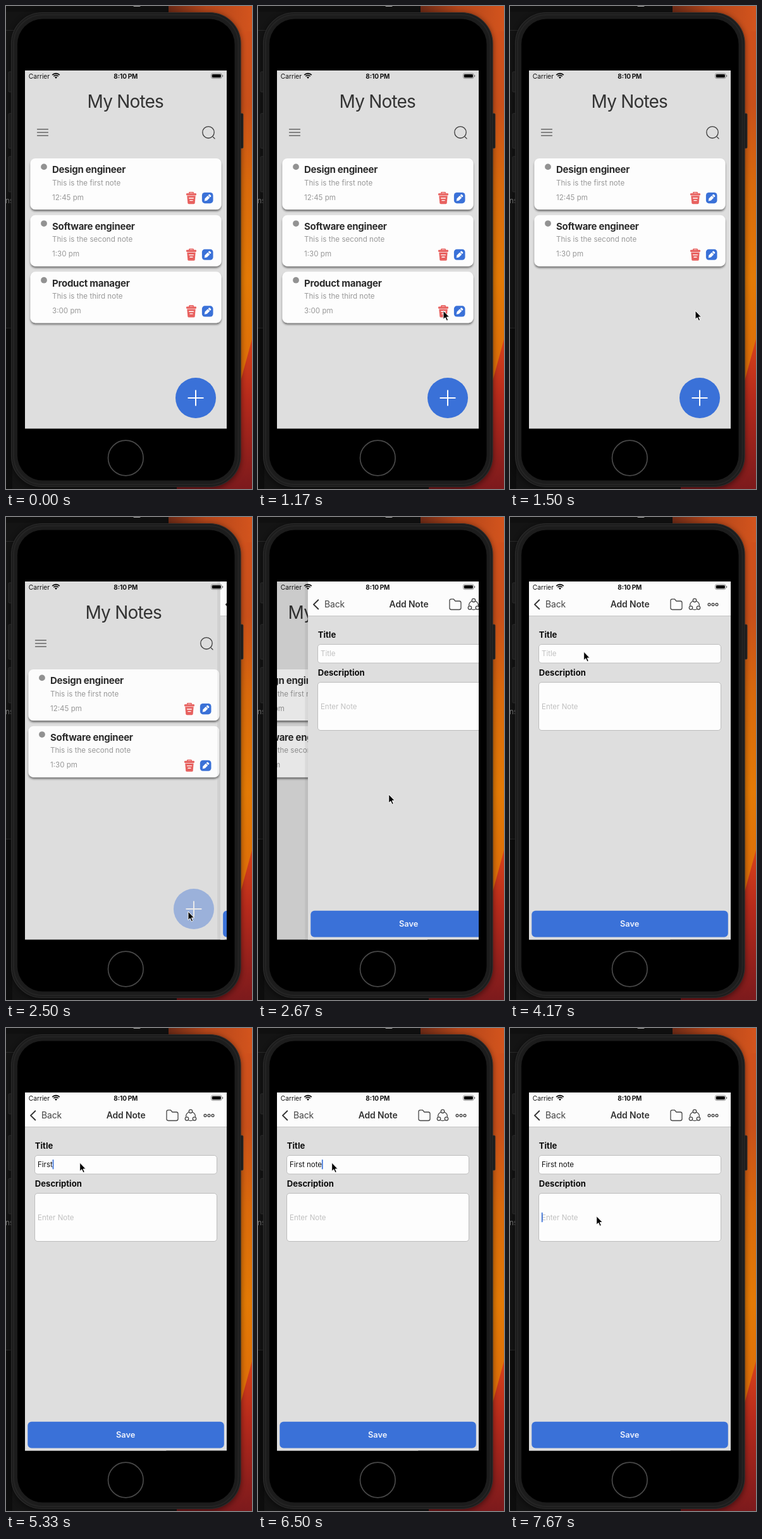
Recreate the animation shown at these times as an HTML page. Size 389 by 764 pixels, loop 8000 ms.

```html
<!DOCTYPE html>
<html lang="en">
<head>
<meta charset="utf-8">
<title>Notes</title>
<style>
  html, body { margin: 0; width: 100%; height: 100%; overflow: hidden; background: #131313; }
  svg { display: block; width: 100%; height: 100%; }
  text { font-family: Inter, Roboto, sans-serif; white-space: pre; }
  .h1 { font-size: 28px; letter-spacing: -.8px; fill: #333; }
  .name { font-size: 15px; font-weight: 700; letter-spacing: -.25px; fill: #2b2b2b; }
  .sub { font-size: 11.6px; fill: #999; }
  .status { font-size: 10.2px; fill: #111; }
  .clock { font-size: 10px; font-weight: 700; }
  .nav { font-size: 13.9px; letter-spacing: -.1px; fill: #444; }
  .label { font-size: 13.1px; font-weight: 700; fill: #0c0c0c; }
  .input { font-size: 11.5px; fill: #111; }
  .hint { fill: #c0c0c0; }
  .save { font-size: 12.8px; font-weight: 600; fill: #eef2fc; }
  .line { fill: none; stroke: #444; stroke-width: 1.3; stroke-linecap: round; stroke-linejoin: round; }
</style>
</head>
<body>
<svg id="stage" viewBox="0 0 389 764" preserveAspectRatio="none"></svg>
<script>
const TICK = 1000 / 6, LOOP = 8000, SCREEN_W = 319;
const BLUE = '#3a71d8', GREY = '#dedede';

const rect = (x, y, w, h, r, fill, more = '') =>
  `<rect x="${x}" y="${y}" width="${w}" height="${h}" rx="${r}" fill="${fill}" ${more}/>`;
const circle = (x, y, r, fill, more = '') =>
  `<circle cx="${x}" cy="${y}" r="${r}" fill="${fill}" ${more}/>`;
const text = (x, y, cls, s, more = '') => `<text x="${x}" y="${y}" class="${cls}" ${more}>${s}</text>`;
const line = (d, more = '') => `<path class="line" d="${d}" ${more}/>`;
const mid = 'text-anchor="middle"';

const defs = `<defs>
  <linearGradient id="wallTop"><stop stop-color="#6b2a16"/><stop offset=".45" stop-color="#b2451a"/><stop offset="1" stop-color="#d3541d"/></linearGradient>
  <linearGradient id="wall" x1="0" y1="0" x2="0" y2="1">
    <stop stop-color="#cf501c"/><stop offset=".2" stop-color="#c9501a"/><stop offset=".42" stop-color="#d96a0c"/>
    <stop offset=".68" stop-color="#e37a06"/><stop offset="1" stop-color="#dc6a0a"/></linearGradient>
  <linearGradient id="wallLow" x1="0" y1="0" x2="0" y2="1">
    <stop stop-color="#d8421a"/><stop offset=".4" stop-color="#b52a1c"/><stop offset="1" stop-color="#7c1a1c"/></linearGradient>
  <filter id="cardShadow" x="-5%" y="-10%" width="110%" height="130%">
    <feDropShadow dx="0" dy="2.6" stdDeviation="1.5" flood-color="#000" flood-opacity=".48"/></filter>
  <filter id="soft" x="-10%" y="-10%" width="120%" height="120%"><feGaussianBlur stdDeviation="4"/></filter>
  <clipPath id="screen"><rect x="30" y="102" width="${SCREEN_W}" height="566.5"/></clipPath>
</defs>`;

function desktop() {
  return rect(0, 0, 389, 764, 0, '#141414')
    + rect(0, 0, 257, 9, 0, '#101010') + rect(0, 38, 20, 1, 0, '#2a2a2a')
    + rect(0, 509, 10, 255, 0, '#0d0d0d') + rect(0, 509, 10, 1, 0, '#292929')
    + rect(201, -3, 12, 4, 2, '#aaa')
    + text(-1, 312, 'sub', 'ns', 'style="fill:#777"')
    + rect(257, 0, 132, 70, 0, 'url(#wallTop)')
    + rect(365, 40, 24, 580, 0, 'url(#wall)')
    + '<path d="M389 527L368 604L330 740L270 755V764H389Z" fill="url(#wallLow)"/>';
}

function phone() {
  const buttons = [[4, 104, 32], [4, 170, 55], [4, 238, 56], [369, 170, 55]]
    .map(([x, y, h]) => rect(x, y, 6, h, 1.5, '#1b1b1b', 'stroke="#343434" stroke-width=".8"')).join('');
  return rect(7, 11, 365, 753, 50, '#000', 'opacity=".45" filter="url(#soft)"')
    + buttons
    + rect(8.5, 10.5, 362.5, 750, 49, '#1c1c1c', 'stroke="#2c2c2c" stroke-width="1.2"')
    + rect(12, 14, 355.5, 743, 46, 'none', 'stroke="#242424" stroke-width="2"')
    + rect(18, 20.5, 343.5, 730, 40, '#000')
    + circle(189.3, 715, 27.8, 'none', 'stroke="#484848" stroke-width="1.7"');
}

const bin = `<g fill="#e8615f">
  <path d="M-4 -7V-8.2Q-4 -9.6 -2.6 -9.6H2.6Q4 -9.6 4 -8.2V-7H2.4V-8H-2.4V-7Z"/>
  ${rect(-8, -7.4, 16, 3.2, 1.2, '#e8615f')}
  <path d="M-6.7 -3.4H6.7L5.7 8Q5.5 9.6 3.9 9.6H-3.9Q-5.5 9.6 -5.7 8Z"/>
  <path d="M-3.3 .4H3.3M-2 4H2" stroke="#fff" stroke-width="1.4" stroke-linecap="round"/></g>`;

const pencil = rect(-8.8, -8.6, 17.6, 17.2, 4.6, BLUE)
  + `<g transform="rotate(45)" fill="#fff"><path d="M-2.3 -2.7H2.3V3.6L0 7L-2.3 3.6Z"/>
     ${rect(-2.3, -6.4, 4.6, 2.9, 1.2, '#fff')}</g>`;

function card(i, name, sub, time) {
  return `<g id="card${i}" transform="translate(0 ${i * 89.65})">`
    + rect(38.5, 241, 302, 81, 8, '#fdfdfd', 'filter="url(#cardShadow)"')
    + circle(60, 254.4, 4.9, '#929292')
    + text(73, 264.3, 'name', name) + text(73, 283.8, 'sub', sub) + text(73, 306.8, 'sub', time)
    + `<g id="bin${i}" transform="translate(293 303.6)">${bin}</g>`
    + `<g transform="translate(318.7 303.6)">${pencil}</g></g>`;
}

function listView() {
  return '<g id="list">' + rect(30, 102, SCREEN_W, 567, 0, GREY)
    + text(188.8, 160.6, 'h1', 'My Notes', mid)
    + line('M49.5 195H66.5M49.5 200H66.5M49.5 205H66.5', 'style="stroke:#666"')
    + line('M327.5 207.2L330 209.7') + circle(320, 199.8, 9.2, 'none', 'stroke="#3c3c3c" stroke-width="1.3"')
    + card(0, 'Design engineer', 'This is the first note', '12:45 pm')
    + card(1, 'Software engineer', 'This is the second note', '1:30 pm')
    + card(2, 'Product manager', 'This is the third note', '3:00 pm')
    + `<g id="plus">${circle(300, 620, 32, BLUE)}
       <path d="M288.3 620H311.7M300 608.3V631.7" stroke="#fff" stroke-width="2" stroke-linecap="round"/></g>`
    + rect(30, 102, SCREEN_W, 567, 0, '#000', 'id="dim" opacity="0"') + '</g>';
}

function formView() {
  const node = (x, y) => circle(x, y, 2.7, 'none', 'class="line"');
  const field = (y, h) => rect(45.5, y, 288, h, 4.5, '#fdfdfd', 'stroke="#bdbdbd" stroke-width="1"');
  return '<g id="form">'
    + rect(26, 102, 8, 567, 0, '#000', 'opacity=".1" filter="url(#soft)"')
    + rect(30, 102, SCREEN_W, 567, 0, GREY)
    + rect(30, 102, SCREEN_W, 54, 0, '#fcfcfc') + rect(30, 156, SCREEN_W, 1, 0, '#c4c4c4')
    + line('M46.3 131.3L39 138.4L46.3 145.5', 'style="stroke:#333;stroke-width:2"')
    + text(56, 143.2, 'nav', 'Back')
    + text(189.6, 143.2, 'nav', 'Add Note', mid + ' font-weight="600" style="fill:#333"')
    + line('M254 132.5Q254 129.8 256.7 129.8H260.2L263 133H269.3Q272 133 272 135.7V143.8Q272 146.5 269.3 146.5H256.7Q254 146.5 254 143.8Z')
    + node(292, 131.8) + node(286, 143.6) + node(298, 143.6)
    + line('M288.6 133.3Q284.6 135.6 284.6 140M295.4 133.3Q299.4 135.6 299.4 140M289 146Q292 147.3 295 146')
    + [315, 321, 327].map(x => circle(x, 138.4, 1.9, 'none', 'class="line"')).join('')
    + text(45.8, 190.8, 'label', 'Title') + field(201.5, 29.5)
    + text(50, 220.3, 'input hint', 'Title', 'id="hint"') + text(50, 220.3, 'input', '', 'id="typed"')
    + text(45.8, 250.8, 'label', 'Description') + field(261.5, 76)
    + text(50, 303.9, 'input hint', 'Enter Note')
    + rect(0, 0, 1.7, 15.5, .8, BLUE, 'id="caret"')
    + rect(34.3, 622.8, 310.5, 41.7, 6, BLUE)
    + text(189.2, 648.3, 'save', 'Save', mid) + '</g>';
}

function statusBar() {
  const arc = (r, w) => `<path d="M${79 - r * .72} ${114.8 - r * .7}A${r} ${r} 0 0 1 ${79 + r * .72} ${114.8 - r * .7}" fill="none" stroke="#111" stroke-width="${w}"/>`;
  return text(35.8, 114.6, 'status', 'Carrier')
    + arc(8, 1.8) + arc(5.1, 1.7) + '<path d="M79 115L77 112.7Q79 111 81 112.7Z" fill="#111"/>'
    + text(189.3, 114.6, 'status clock', '8:10\u2009PM', mid)
    + rect(324.5, 106.6, 16.6, 8, 2.4, 'none', 'stroke="#777" stroke-width=".8"')
    + rect(325.8, 107.9, 14, 5.4, 1.3, '#000') + rect(342, 109, 1.2, 3.2, .6, '#777');
}

document.getElementById('stage').innerHTML = defs + desktop() + phone()
  + `<g clip-path="url(#screen)">${listView()}${formView()}${statusBar()}</g>`
  + `<path id="cursor" d="M0 0V13.6L3.1 10.8L5.3 15.8L7.6 14.8L5.4 10H9.6Z" fill="#000" stroke="#fff" stroke-width="1" stroke-linejoin="round"/>`;

const el = id => document.getElementById(id);
const set = (id, attrs) => { for (const k in attrs) el(id).setAttribute(k, attrs[k]); };
const move = (id, x, y = 0) => set(id, { transform: `translate(${x} ${y})` });

// Pointer stops: tick, x, y
const stops = [[3, 382, 548], [7, 293, 482], [10, 293, 482], [13, 288, 624], [15, 288, 624],
  [17, 125.5, 253.5], [19, 116.7, 213], [41, 116.7, 213], [45, 136.8, 297.5]];
// Typing: tick, number of letters shown
const keys = [[26, 1], [29, 2], [30, 3], [32, 5], [34, 6], [35, 7], [36, 8], [38, 9], [39, 10]];

function pointer(n) {
  const i = stops.findIndex(s => s[0] > n);
  if (i < 0) return stops[stops.length - 1].slice(1);
  if (i === 0) return [stops[0][1], stops[0][2]];
  const [a, b] = [stops[i - 1], stops[i]];
  const u = (n - a[0]) / (b[0] - a[0]), e = u * u * (3 - 2 * u);
  return [1, 2].map(k => a[k] + (b[k] - a[k]) * e);
}

// Critically damped push; returns the share of the way still to go
function remaining(ms) {
  const wt = Math.max(0, ms - 2485) * .0184;
  return (1 + wt) * Math.exp(-wt);
}

function draw(ms) {
  const n = Math.floor((ms + 5) / TICK);
  const left = remaining(n * TICK);
  move('list', -(1 - left) * SCREEN_W * .3);
  set('dim', { opacity: (1 - left) * .1 });
  move('form', left * SCREEN_W);
  set('form', { visibility: left < 1 ? 'visible' : 'hidden' });

  set('card2', { visibility: n < 9 ? 'visible' : 'hidden' });
  set('bin2', { opacity: n === 8 ? .3 : 1 });
  set('plus', { opacity: n === 14 ? .25 : n === 15 ? .4 : 1 });

  const count = keys.reduce((c, [at, len]) => n >= at ? len : c, 0);
  el('typed').textContent = 'First note'.slice(0, count).replace(' ', '\u00a0');
  set('hint', { visibility: count || left === 1 ? 'hidden' : 'inherit' });
  const inTitle = n >= 21 && n < 45 && n !== 25, inBody = n >= 46;
  set('caret', {
    visibility: inTitle || inBody ? 'inherit' : 'hidden',
    x: 49.9 + (inBody || !count ? 0 : el('typed').getComputedTextLength()),
    y: inBody ? 291.7 : 208
  });

  move('cursor', ...pointer(n));
  set('cursor', { visibility: n < 3 ? 'hidden' : 'visible' });
}

const start = performance.now();
function frame() {
  draw((performance.now() - start) % LOOP);
  requestAnimationFrame(frame);
}
frame();
</script>
</body>
</html>
```
